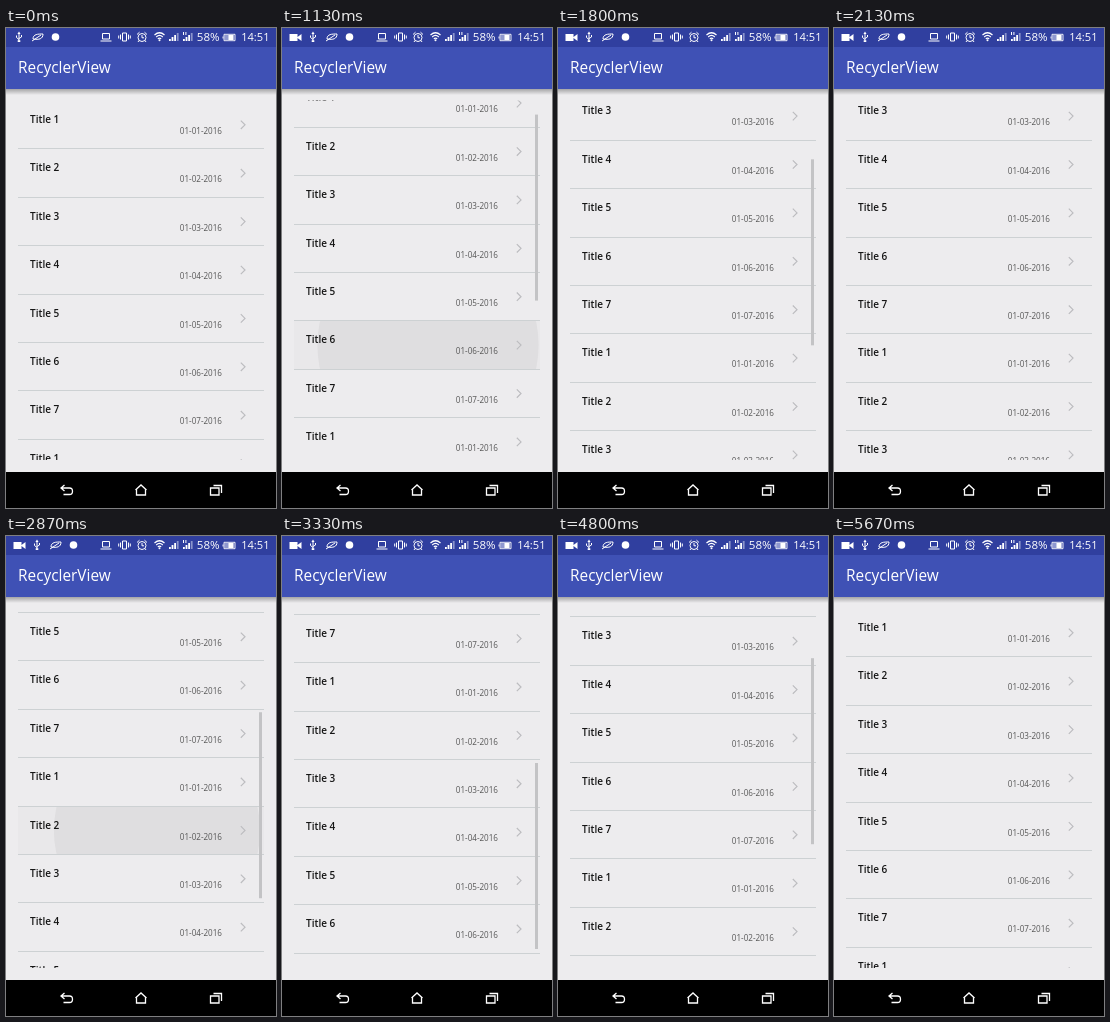
An HTML page with a canvas for the animation above (5.74 s loop, 270x480 px).

```html
<!DOCTYPE html>
<html lang="en">
<head>
<meta charset="utf-8">
<title>RecyclerView</title>
<style>
  html, body { margin: 0; width: 100%; height: 100%; overflow: hidden; background: #edecee; }
  canvas { display: block; width: 100vw; height: 100vh; }
</style>
</head>
<body>
<canvas id="stage" width="270" height="480"></canvas>
<script>
const ctx = document.getElementById('stage').getContext('2d');
const LOOP = 5740, STEP = 200 / 3;
const TOP = 72.6, BOTTOM = 432, LEFT = 12, RIGHT = 258, ROW = 48.4, ROWS = 14;
const FONT = '"Open Sans", "Noto Sans", sans-serif';

// Swipes: start, end, scroll from, scroll to, ease-out power
const swipes = [
  [1050, 1600, 0, 105.5, 1.4],
  [2680, 3070, 105.5, 221, 2],
  [3200, 3450, 221, 318, 1.4],
  [4500, 4930, 318, 0, 1.07]
];
// Scrollbar: shown from, fades from
const bars = [[1050, 1880], [2680, 3740], [4500, 5220]];
// Touch ripples: row, centre x, start, growth time, final radius, fade start
const ripples = [
  [5, 146, 980, 200, 117, 1140],
  [8, 151, 2600, 400, 116, 2880]
];

const clamp = v => Math.max(0, Math.min(1, v));
const easeOut = (p, power) => 1 - (1 - clamp(p)) ** power;

function scrollAt(t) {
  let y = 0;
  for (const [a, b, from, to, power] of swipes)
    if (t >= a) y = from + (to - from) * easeOut((t - a) / (b - a), power);
  return y;
}

function rect(color, x, y, w, h) {
  ctx.fillStyle = color;
  ctx.fillRect(x, y, w, h);
}

function text(str, x, y, size, weight, color, align = 'left') {
  ctx.font = `${weight} ${size}px ${FONT}`;
  ctx.textAlign = align;
  ctx.fillStyle = color;
  ctx.fillText(str, x, y);
}

function stroke(d, x, y, width = 1, color = '#fff') {
  ctx.save();
  ctx.translate(x, y);
  ctx.strokeStyle = color;
  ctx.lineWidth = width;
  ctx.stroke(new Path2D(d));
  ctx.restore();
}

function fill(d, x, y, color = '#fff') {
  ctx.save();
  ctx.translate(x, y);
  ctx.fillStyle = color;
  ctx.fill(new Path2D(d));
  ctx.restore();
}

function disc(x, y, r, color = '#fff') {
  ctx.fillStyle = color;
  ctx.beginPath();
  ctx.arc(x, y, r, 0, 7);
  ctx.fill();
}

function drawRipple([row, cx, start, grow, radius, fade], t, scroll) {
  const alpha = clamp(1 - (t - fade) / 200);
  if (t < start || !alpha) return;
  const y = TOP + row * ROW - scroll;
  ctx.save();
  ctx.beginPath();
  ctx.rect(LEFT, y, RIGHT - LEFT, ROW);
  ctx.clip();
  ctx.globalAlpha = alpha;
  rect('rgba(0,0,0,.015)', LEFT, y, RIGHT - LEFT, ROW);
  disc(cx, y + ROW / 2, radius * easeOut((t - start) / grow, 2), 'rgba(0,0,0,.045)');
  ctx.restore();
}

function drawGlow(t, start, edge, dir) {
  const age = t - start;
  if (age <= 0 || age >= 540) return;
  const power = age < 100 ? age / 100 : (1 - (age - 100) / 440) ** 2;
  const width = RIGHT - LEFT, radius = width * 1.5, height = radius * (1 - Math.cos(Math.PI / 6));
  ctx.save();
  ctx.translate(LEFT + width / 2, edge);
  ctx.scale(1, dir * Math.sqrt(power));
  ctx.globalAlpha = 0.3 * power;
  disc(0, height - radius, radius, '#3f51b5');
  ctx.restore();
}

function drawList(t) {
  const scroll = scrollAt(t);
  ctx.save();
  ctx.beginPath();
  ctx.rect(LEFT, TOP, RIGHT - LEFT, BOTTOM - TOP);
  ctx.clip();
  for (const r of ripples) drawRipple(r, t, scroll);
  for (let i = 0; i < ROWS; i++) {
    const y = TOP + i * ROW - scroll, n = i % 7 + 1;
    if (y > BOTTOM || y + ROW < TOP - 1) continue;
    text(`Title ${n}`, 24, y + 22.4, 10, 600, '#151515');
    text(`01-0${n}-2016`, 216, y + 33.4, 8.1, 400, '#555', 'right');
    stroke('M-2.2-4.2L2-0L-2.2 4.2', 237, y + 24.2, 1.2, '#bdbdc0');
    rect('#cdd1d3', LEFT, Math.round(y + ROW - 0.6), RIGHT - LEFT, 1);
  }
  for (const [show, fade] of bars)
    if (t >= show) {
      ctx.globalAlpha = clamp(1 - (t - fade) / 240);
      rect('#c3c3c5', 253, 75 + 0.534 * scroll, 3, 186);
    }
  ctx.globalAlpha = 1;
  drawGlow(t, 3450, BOTTOM, -1);
  drawGlow(t, 4930, TOP, 1);
  ctx.restore();
}

function drawSignal(x) {
  for (let i = 0; i < 4; i++) rect(i < 3 ? '#fff' : '#8b94cb', x + i * 2.6, 11 - i * 2, 1.8, 2 + i * 2);
}

function drawStatus(t) {
  rect('#303f9f', 0, 0, 270, 19);
  const recording = t >= 60, shift = recording ? 18 : 0;
  if (recording) fill('M-6-3H2V4H-6ZM2 0L6-3V4L2 1Z', 13.5, 9);
  // USB, power saver, notification
  stroke('M0-4V4M-2.5-1.5V.5L0 2.5M2.5-2V0L0 1.5', 13 + shift, 9);
  fill('M-1.6-3L0-5.5L1.6-3ZM-1.3 3.2H1.3V5H-1.3Z', 13 + shift, 9);
  stroke('M-5 2C-5-3 0-3 5-3C5 2 1 3-5 2ZM-6 4L3-2', 32 + shift, 9);
  disc(49.5 + shift, 9, 3.8);
  // Laptop, vibrate, alarm
  stroke('M-3.5-3.5H3.5V2H-3.5ZM-5.5 4H5.5', 100, 9);
  stroke('M-2-4H2V4H-2ZM-4-2.5V2.5M4-2.5V2.5M-5.8-1.5V1.5M5.8-1.5V1.5', 118.5, 9);
  stroke('M4 .5A4 4 0 1 1-4 .5A4 4 0 1 1 4 .5M0-2V.8H2M-5-2.5L-2.5-4.8M5-2.5L2.5-4.8M-3 3.5L-4 5M3 3.5L4 5', 136, 9);
  // Wi-Fi and reception
  stroke('M-5-1.5Q0-6 5-1.5M-3.3.5Q0-2.6 3.3.5M-1.7 2.3Q0 1 1.7 2.3', 153.5, 8.5, 1.2);
  disc(153.5, 12.2, 1);
  drawSignal(163);
  drawSignal(177);
  rect('#fff', 177, 4, 1, 3);
  rect('#fff', 179.4, 4, 1, 3);
  text('58%', 190.8, 13.2, 11.6, 500, '#fff');
  // Battery
  rect('#8f98cf', 218.5, 7, 9, 5);
  rect('#fff', 222.5, 7, 5, 5);
  stroke('M-5.5-3.2H5.5V3.2H-5.5ZM-6.5-1V1', 223.5, 9.5, 0.9);
  text('14:51', 263.5, 13.2, 11.1, 500, '#fff', 'right');
}

function drawToolbar() {
  const shadow = ctx.createLinearGradient(0, 61, 0, 67);
  shadow.addColorStop(0, 'rgba(0,0,0,.3)');
  shadow.addColorStop(1, 'rgba(0,0,0,0)');
  rect(shadow, 0, 61, 270, 6);
  rect('#3f51b5', 0, 19, 270, 42);
  text('RecyclerView', 12, 45, 15.4, 500, '#fff');
}

function drawNav() {
  rect('#000', 0, 444, 270, 36);
  stroke('M-2-5L-5.5-2L-2 1M-5.5-2H3Q6-2 6 1.2Q6 4.5 3 4.5H-3', 60.5, 462, 1.3);
  stroke('M-5.5 0L0-5L5.5 0M-4.5-.8V5H4.5V-.8', 135, 462, 1.3);
  stroke('M-5.5-2.5H3V4.5H-5.5ZM-2.5-5H5.5V2.5', 210, 462.5, 1.3);
}

function draw(now) {
  const t = Math.floor((now % LOOP + 4) / STEP) * STEP;
  rect('#edecee', 0, 0, 270, 480);
  drawList(t);
  drawToolbar();
  drawStatus(t);
  drawNav();
}

const begin = performance.now();
function tick() {
  draw(performance.now() - begin);
  requestAnimationFrame(tick);
}
tick();
</script>
</body>
</html>
```
